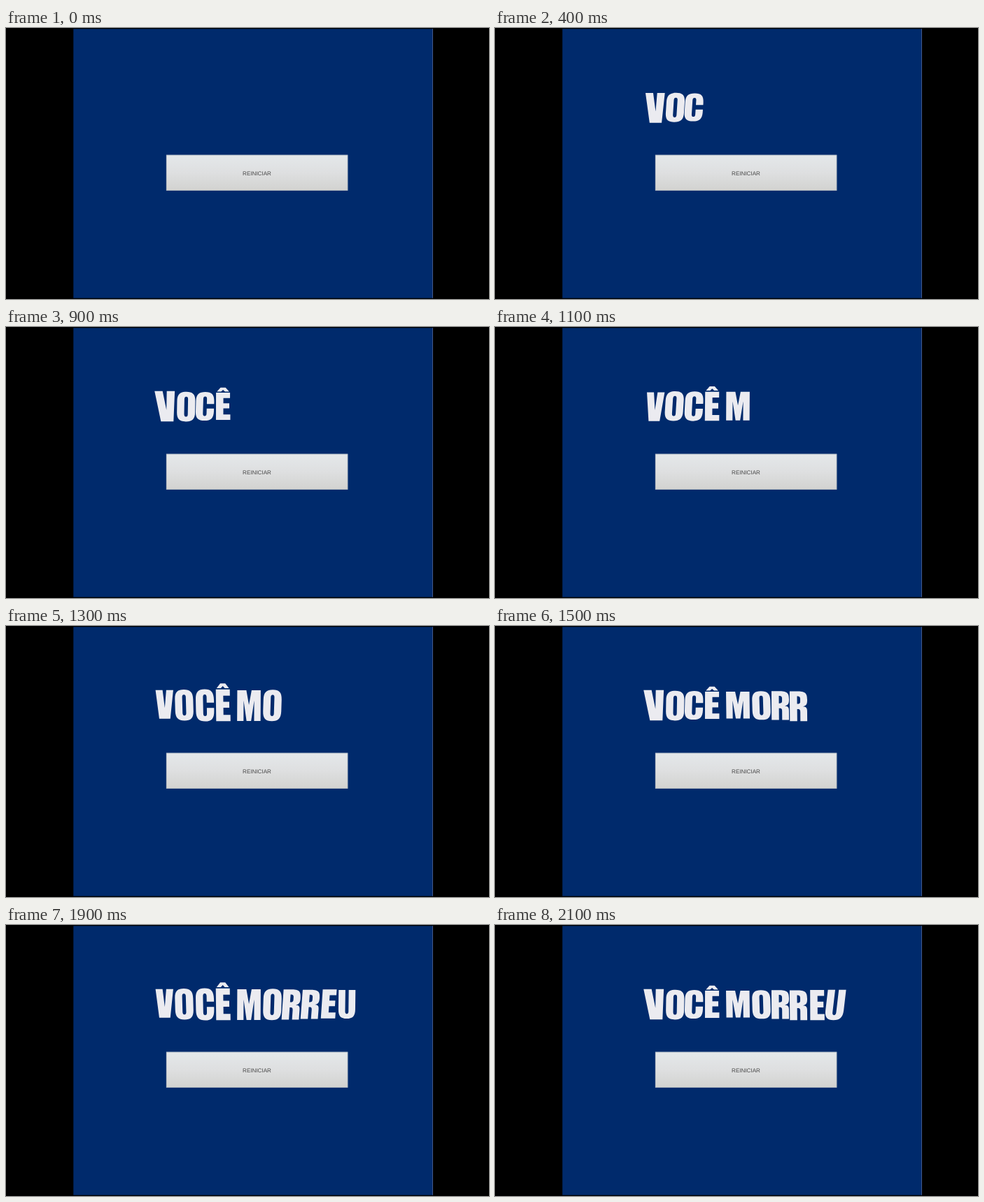
Recreate the animation shown at these times as an HTML page. Size 690x388 px, loop 2200 ms.

```html
<!DOCTYPE html>
<html lang="pt">
<head>
<meta charset="utf-8">
<title>Você morreu</title>
<style>
  html, body { margin: 0; width: 100%; height: 100%; overflow: hidden; background: #000; }
  svg { display: block; width: 690px; height: 388px; }
  .label {
    font: 8.1px "Liberation Sans", Arial, sans-serif;
    fill: #484848; text-anchor: middle; text-rendering: geometricPrecision;
  }
  #title { fill: #ebebf0; fill-rule: evenodd; }
</style>
</head>
<body>
<svg viewBox="0 0 690 388">
  <defs>
    <linearGradient id="face" x1="0" y1="0" x2="0" y2="1">
      <stop offset="0" stop-color="#e4e8ea"/>
      <stop offset=".5" stop-color="#dedfe0"/>
      <stop offset="1" stop-color="#d2d2d0"/>
    </linearGradient>
  </defs>
  <rect x="96.3" y="1.3" width="513.7" height="385.4" fill="#002a6c"/>
  <rect x="609" y="1.3" width="1" height="385.4" fill="#41598a"/>
  <rect x="229" y="181.8" width="259.2" height="51" fill="url(#face)"/>
  <rect x="229.2" y="182" width="258.8" height="50.6" fill="none" stroke="#a3abb8" stroke-width=".7"/>
  <text class="label" x="358.5" y="210.5">REINICIAR</text>
  <g id="title" role="img" aria-label="VOCÊ MORREU"></g>
</svg>
<script>
const LOOP = 2200, STEP = 100, WAVE_STEPS = 6;
const FIRST_KEY = 29, KEY_GAP = 183;
const MID_Y = 113.5, CAP = 42;

// Heavy condensed capitals, 42 units tall
const E = "M0 0H20V8.4H10.5V16.3H19V24.3H10.5V33.6H20.5V42H0Z";
const glyphs = {
  V: { w: 26, d: "M0 0H10.3L13.3 26L15.7 0H26L21.2 42H5Z" },
  O: { w: 26, d: "M0 13C0 3 4 -.6 13 -.6S26 3 26 13V29C26 39 22 42.6 13 42.6S0 39 0 29Z" +
                 "M10.4 10V32Q10.4 35.6 13 35.6T15.6 32V10Q15.6 6.4 13 6.4T10.4 10Z" },
  C: { w: 26, d: "M26 17.5H15.6V10Q15.6 6.4 13 6.4T10.4 10V32Q10.4 35.6 13 35.6T15.6 32V24.5H26V28" +
                 "C26 39 22 42.6 13 42.6S0 39 0 29V13C0 3 4 -.6 13 -.6S26 3 26 14Z" },
  E: { w: 20.5, d: E },
  "Ê": { w: 20, d: E + "M1.2 -1.6L6.4 -7.8H13.6L18.8 -1.6H12.8L10 -4.4L7.2 -1.6Z" },
  M: { w: 33.5, d: "M0 0H13L16.8 20L20.5 0H33.5V42H24.3V14L20 42H13.5L9.2 14V42H0Z" },
  R: { w: 25, d: "M0 0H10C22 0 25 2 25 12C25 18 24 20.5 18.8 21.5C23.5 22 24.8 23.5 24.8 28V42H15V29" +
                 "C15 25.5 14 25 10.5 25V42H0ZM10.5 7V17.8C14 17.8 15 17 15 14V11C15 8 14 7 10.5 7Z" },
  U: { w: 26, d: "M0 0H10.4V32Q10.4 35.6 13 35.6T15.6 32V0H26V29C26 39 22 42.6 13 42.6S0 39 0 29Z" }
};

// Each wave is [amplitude, peak step, offset]; lean > 0 pushes the foot right
const letters = [
  { c: "V", key: 0,  x: 227.8, lean: [3.5, 2.5, .5],   grow: [.04, 3],       bob: [1.1, 4.3, -.2], sway: [1.3, 4], widen: [.09, 3, .02] },
  { c: "O", key: 1,  x: 256,   lean: [2.2, 1.5, -.7],  grow: [.03, 1],       bob: [.6, 3],         sway: [1.6, 3.6] },
  { c: "C", key: 2,  x: 284.2, lean: [1.8, 1.3, -.8],  grow: [.07, .8],      bob: [0, 0] },
  { c: "Ê", key: 3,  x: 310,   lean: [.6, 1.3],        grow: [.09, .6],      bob: [0, 0] },
  { c: "M", key: 5,  x: 347,   lean: [.5, 3],          grow: [.08, .5, -.02], bob: [.5, 1] },
  { c: "O", key: 6,  x: 380.5, lean: [1.5, 3.6],       grow: [.05, .4],      bob: [.5, 2] },
  { c: "R", key: 7,  x: 407.6, lean: [2.2, 4, -.8],    grow: [.03, 1],       bob: [.8, 2] },
  { c: "R", key: 8,  x: 434,   lean: [2.4, 4, -.8],    grow: [.02, 3],       bob: [.8, 3, .5],     sway: [.8, 1] },
  { c: "E", key: 9,  x: 460.8, lean: [2, 4, -.8],      grow: [.03, 3],       bob: [1.1, 3],        sway: [.6, 1] },
  { c: "U", key: 10, x: 486.4, lean: [3, 0, -2],       grow: [.04, 3, -.02], bob: [.6, 3],         sway: [.6, 1], widen: [.05, 3, -.05] }
];

const title = document.getElementById("title");
for (const l of letters) {
  l.node = document.createElementNS("http://www.w3.org/2000/svg", "path");
  l.node.setAttribute("d", glyphs[l.c].d);
  title.append(l.node);
}

const wave = ([amp, peak, offset = 0] = [0, 0], step) =>
  offset + amp * Math.cos((step - peak) * 2 * Math.PI / WAVE_STEPS);

function pose(l, step) {
  const x = l.x + wave(l.sway, step);
  const y = MID_Y + wave(l.bob, step);
  const skew = wave(l.lean, step) / CAP;
  const tall = 1 + wave(l.grow, step);
  const wide = 1 + wave(l.widen, step);
  return `matrix(${wide} 0 ${skew} ${tall} ${x} ${y}) translate(${-glyphs[l.c].w / 2} ${-CAP / 2})`;
}

const start = performance.now();
function draw(now) {
  const step = Math.floor(Math.max(0, now - start) % LOOP / STEP);
  for (const l of letters) {
    const shown = step * STEP >= FIRST_KEY + l.key * KEY_GAP;
    l.node.setAttribute("visibility", shown ? "visible" : "hidden");
    l.node.setAttribute("transform", pose(l, step));
  }
  requestAnimationFrame(draw);
}
draw(start);
</script>
</body>
</html>
```
